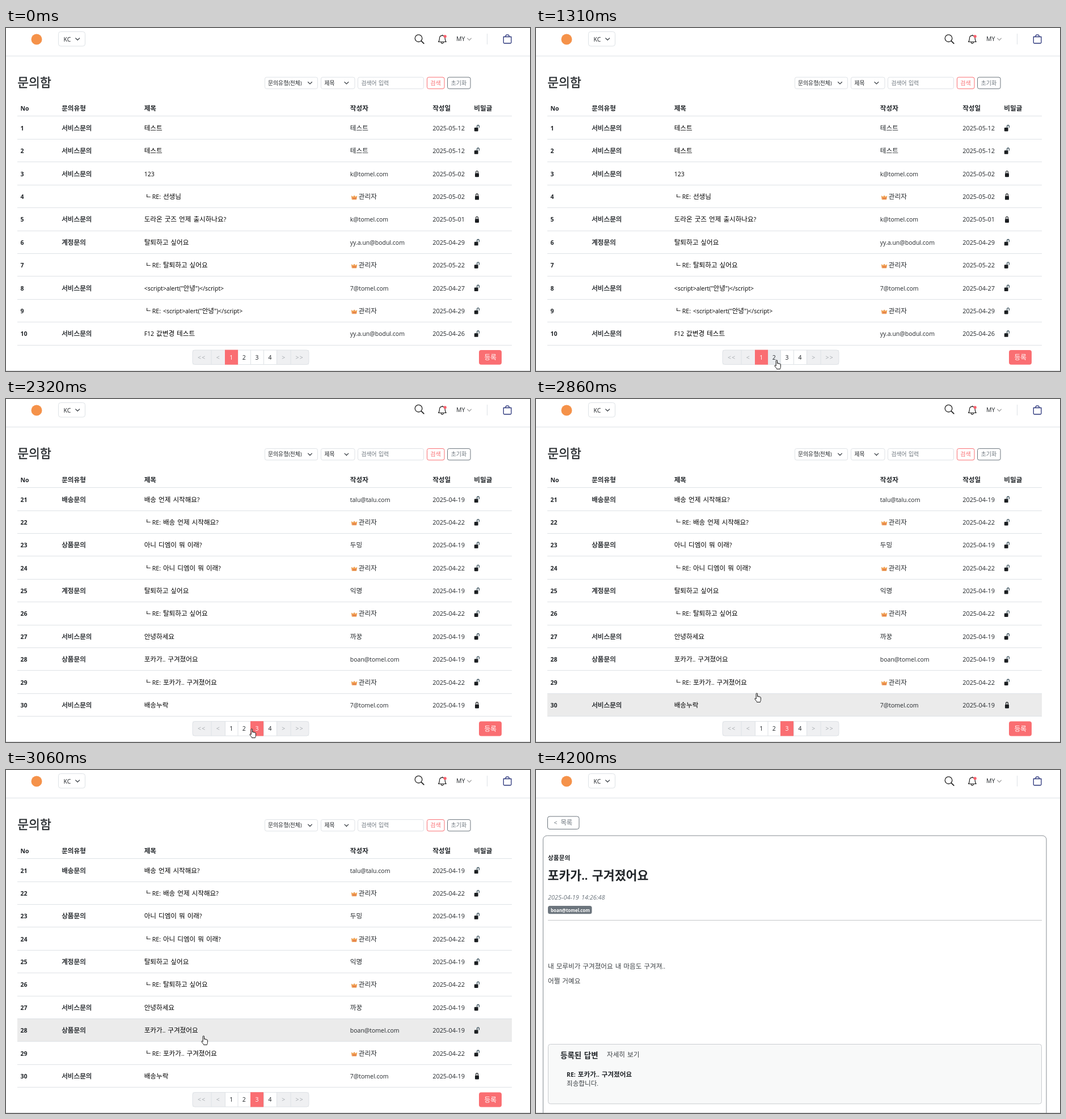
Write an HTML page that moves like this. It is 924 by 606 pixels and loops after 5390 ms.

```html
<!DOCTYPE html>
<html lang="ko">
<head>
<meta charset="utf-8">
<title>문의함</title>
<style>
html, body { margin: 0; width: 100%; height: 100%; overflow: hidden; background: #fff; }
svg { display: block; position: absolute; left: 0; top: 0; }
text { font-family: "Open Sans", "Noto Sans", "Noto Sans CJK KR", sans-serif; word-spacing: .12em; white-space: pre; }
tspan { font-family: "Noto Sans CJK KR", "Noto Sans CJK", sans-serif; font-size: 1.105em; }
</style>
</head>
<body>
<svg width="924" height="606" viewBox="0 0 924 606">
  <g id="view"></g>
  <g id="cursor" fill="#fff" stroke="#111" stroke-linejoin="round"><path id="shape"/></g>
</svg>
<script>
const LOOP = 5390, INK = '#212529', SOFT = '#3c4044', GREY = '#6c757d', LINE = '#dee2e6', RED = '#fa6e72';
const $ = id => document.getElementById(id);

const TYPES = { S: '서비스문의', A: '계정문의', D: '배송문의', P: '상품문의', '': '' };
// type | title | author | date | secret; a row without a type is the administrator's reply
const PAGES = [
  ['S|테스트|테스트|05-12', 'S|테스트|테스트|05-12', 'S|123|k@tomel.com|05-02|1', '|선생님||05-02|1',
   'S|도라온 굿즈 언제 출시하나요?|k@tomel.com|05-01|1', 'A|탈퇴하고 싶어요|yy.a.un@bodul.com|04-29',
   '|탈퇴하고 싶어요||05-22', 'S|<script>alert("안녕")<\/script>|7@tomel.com|04-27',
   '|<script>alert("안녕")<\/script>||04-29', 'S|F12 값변경 테스트|yy.a.un@bodul.com|04-26'],
  ['S|상품문의할게|7@tomel.com|04-23', 'A|계정문의할게요|마도린|04-23', 'S|저를 사칭해요|k@tomel.com|04-22|1',
   '|저를 사칭해요||04-22|1', 'A|로그인이 안 돼요|로그인되게 해주세요|04-21', '|로그인이 안 돼요||04-22',
   'A|닉네임변경|테스터|04-19', '|닉네임변경||04-22', 'S|점검|익명|04-19', '|점검||04-22'],
  ['D|배송 언제 시작해요?|talu@talu.com|04-19', '|배송 언제 시작해요?||04-22', 'P|아니 디엠이 뭐 이래?|두밍|04-19',
   '|아니 디엠이 뭐 이래?||04-22', 'A|탈퇴하고 싶어요|익명|04-19', '|탈퇴하고 싶어요||04-22',
   'S|안녕하세요|까꿍|04-19', 'P|포카가.. 구겨졌어요|boan@tomel.com|04-19',
   '|포카가.. 구겨졌어요||04-22', 'S|배송누락|7@tomel.com|04-19|1']
];
const CELLS = [329, 361.5, 386, 408.5, 431, 454, 477, 501.5, 534];

function text(x, y, s, size = 10.5, fill = INK, more = '') {
  const body = s.replace(/</g, '&lt;').replace(/[\u3131-\uD7A3]+/g, '<tspan>$&</tspan>');
  return `<text x="${x}" y="${y}" font-size="${size}" fill="${fill}" ${more}>${body}</text>`;
}
const bold = (x, y, s, size, fill) => text(x, y, s, size, fill, 'font-weight="700"');
const medium = (x, y, s, size) => text(x, y, s, size, INK, `stroke="${INK}" stroke-width=".35"`);
const rect = (x, y, w, h, fill, stroke = 'none', r = 0) =>
  `<rect x="${x}" y="${y}" width="${w}" height="${h}" rx="${r}" fill="${fill}" stroke="${stroke}"/>`;
const box = (x, y, w, h, stroke = LINE, r = 3) => rect(x, y, w, h, '#fff', stroke, r);
const path = (d, stroke, width = 1.2, fill = 'none') =>
  `<path d="${d}" fill="${fill}" stroke="${stroke}" stroke-width="${width}" stroke-linecap="round" stroke-linejoin="round"/>`;
const chevron = (x, y, color = '#343a40') => path(`M${x} ${y}l3.4 3.4 3.4-3.4`, color);
const at = (x, y, s) => `<g transform="translate(${x} ${y})">${s}</g>`;

function header(lift) {
  return rect(0, 49, 924, 1, LINE) + rect(0, 605, 924, 1, '#d5d6d8')
    + '<circle cx="54" cy="20" r="9.5" fill="#f5924a"/>'
    + box(92.5, 6.5, 47, 25.5, LINE, 4) + text(101.5, 23.5, 'KC') + chevron(122.8, 18)
    + at(0, -lift, '<circle cx="727.5" cy="18.2" r="6.3" fill="none" stroke="#222" stroke-width="1.3"/>'
      + path('M732.2 22.8l4.6 4.6', '#222', 1.7))
    + path('M762.5 24.5c2-2 1.8-4.5 2-7 .4-5.5 9-5.5 9.6 0 .2 2.5 0 5 2 7zM767.3 25c.3 3.2 3.6 3.2 4 0M769.3 13v-1', '#222')
    + '<circle cx="774.2" cy="14.8" r="2.6" fill="#fa5f6b"/>'
    + text(794, 23.3, 'MY') + chevron(813.6, 18.2, '#999')
    + rect(848, 10, 1, 19, LINE)
    + path('M877.3 15.5h13.6v10q0 1.5-1.5 1.5h-10.6q-1.5 0-1.5-1.5zM880.8 15.5c0-4.8 6.6-4.8 6.6 0', '#29347a', 1.3);
}

function lock(y, closed) {
  return closed
    ? rect(827, y - 1.3, 7, 6.8, '#1b1e21', 'none', 1.2) + path(`M828.6 ${y - 1}v-2c0-3 3.8-3 3.8 0v2`, '#1b1e21')
    : rect(825.8, y - 1, 6.8, 6.5, '#1b1e21', 'none', 1.2) + path(`M830.6 ${y - 1}v-2.2c0-3 3.7-3 3.7 0v2`, '#2c4450');
}

const crown = y => path(`M609.5 ${y - 1.2}l2.6 1.6 2-2.6 2 2.6 2.7-1.6-1 6h-7.3z`, '#eda35c', .8, '#f2a04e')
  + path(`M611.5 ${y + 3}h5.5`, '#dc6a4c', 1.3);

function tools() {
  return box(456.5, 87, 93, 20.3) + text(462, 100.8, '문의유형(전체)', 8.9) + chevron(532.6, 95.5)
    + box(555.5, 87, 59.5, 20.3) + text(561.5, 100.8, '제목', 8.9) + chevron(597, 95.5)
    + box(620.5, 87, 116, 20.3) + text(626.5, 100.8, '검색어 입력', 8.9, GREY)
    + box(742.5, 87, 30.5, 20.3, RED) + text(748.2, 100.8, '검색', 9.1, RED)
    + box(778.5, 87, 40.5, 20.3, GREY) + text(784.5, 100.8, '초기화', 9.1, GREY);
}

function pager(page, hover) {
  const names = ['<<', '<', '1', '2', '3', '4', '>', '>>'];
  let s = '', marks = '';
  names.forEach((name, i) => {
    const x = CELLS[i], w = CELLS[i + 1] - x, off = i < 2 || i > 5, on = i == page + 2;
    s += rect(x, 569, w, 25.5, off ? '#eff0f2' : i == hover ? '#e9ecef' : '#fff');
    if (i) s += rect(x, 569, 1, 25.5, LINE);
    marks += text(x + w / 2, 585.6, name, 10.5, on ? '#fff' : off ? '#a3a8ad' : INK,
      'text-anchor="middle"' + (name.length > 1 ? ' letter-spacing="1.2"' : ''));
  });
  return s + rect(329, 569, 205, 25.5, 'none', LINE, 4)
    + rect(CELLS[page + 2], 568.6, 23, 26.2, RED) + marks;
}

const lineY = (page, i) => Math.floor(page ? 156.6 + 40.4 * i : 155.9 + 40.44 * i);

function list(page, hoverRow, hoverCell) {
  let lines = '', s = tools();
  if (hoverRow >= 0) {
    const top = lineY(page, hoverRow);
    lines += rect(20, top, 872, lineY(page, hoverRow + 1) - top, '#ebebeb');
  }
  for (let i = 0; i < 11; i++) lines += rect(20, lineY(page, i), 872, 1, LINE);
  [[25.5, 'No'], [98.2, '문의유형'], [243.7, '제목'], [606.8, '작성자'], [752.2, '작성일'], [825.3, '비밀글']]
    .forEach(([x, name]) => s += bold(x, 146.2, name));
  PAGES[page].forEach((row, i) => {
    const [type, title, author, date, secret] = row.split('|');
    const mid = 177 + 40.37 * i, y = mid + 4;
    s += bold(25.5, y, String(page * 10 + i + 1)) + medium(98.2, y, TYPES[type])
      + (type ? text(243.7, y, title, 10.5, '#000')
        : text(246, y - 1.5, 'ㄴ', 10.5, '#000') + text(257.8, y, 'RE: ' + title, 10.5, '#000'))
      + (author ? text(606.8, y, author) : crown(mid) + text(621.8, y, '관리자'))
      + text(752.2, y, '2025-' + date, 10.9) + lock(mid, secret);
  });
  s += pager(page, hoverCell) + rect(834, 569, 40, 25.8, RED, 'none', 4) + text(843.5, 586, '등록', 10.5, '#fff');
  return header(page ? 1.5 : 0) + lines + medium(20.3, 103.8, '문의함', 19.5) + at(0, page ? .6 : 0, s);
}

function detail() {
  return header(0)
    + box(20.5, 82, 55.5, 22.5, GREY, 3.5) + text(31.5, 97, '<', 10.5, GREY) + text(43.5, 97, '목록', 10.2, GREY)
    + rect(12.5, 116, 887.5, 520, 'none', '#868c92', 7)
    + bold(21, 159.2, '상품문의', 9.7) + bold(20.5, 194.2, '포카가.. 구겨졌어요', 19.6)
    + text(21, 228.8, '2025-04-19 14:26:48', 10.9, GREY, 'font-style="italic"')
    + rect(21, 240, 77.5, 14.3, GREY, 'none', 3.5) + bold(26, 250.6, 'boan@tomel.com', 7.9, '#fff')
    + rect(21, 265, 871, 1, '#c4c6c8')
    + text(21, 350.8, '내 모루비가 구겨졌어요 내 마음도 구겨져..', 10.5, SOFT) + text(21, 377.2, '어쩔 거예요', 10.5, SOFT)
    + rect(21.5, 484.5, 870, 105.3, '#f8f9f9', '#c9ccd0', 4)
    + bold(43, 508.6, '등록된 답변', 12.2) + text(125, 507.2, '자세히 보기', 10.5, SOFT)
    + bold(54, 542.2, 'RE: 포카가.. 구겨졌어요') + text(54, 558.4, '죄송합니다.', 10.5, SOFT);
}

// time, x, y of the pointer
const MOVES = [
  [510, 757, 596], [845, 475, 591], [1046, 397, 576], [1113, 399, 579], [1310, 420, 586], [1450, 420, 586],
  [1580, 421, 583], [1980, 428, 583], [2320, 429, 582], [2620, 429, 582], [2855, 385, 519], [3056, 344, 469],
  [3150, 345, 466], [3220, 345, 466], [3400, 334, 454], [3560, 334, 454], [4060, 905, 520], [4128, 907, 521]
];
const ARROW = 'M.5 .5V11.5L3 9.2 4.8 13 6.5 12.2 4.9 8.5H8.3Z';
const HAND = 'M3.2 10V1.9a1.15 1.15 0 0 1 2.3 0V7a1 1 0 0 1 2 0v.4a1 1 0 0 1 2 .2v.5a1 1 0 0 1 1.9.5v4c0 2-1 2.3-1 4H4.5c0-1.5-1.7-2.6-3.5-5.4-.5-1.3.9-2 2.2-.2z';

// The pointer advances in steps of 67 ms
function pointer(t) {
  const q = 510 + Math.floor((t - 500) / 67) * 67;
  const i = MOVES.findIndex(m => m[0] > q);
  if (i < 0) return MOVES[MOVES.length - 1].slice(1);
  if (!i) return MOVES[0].slice(1);
  const [t0, x0, y0] = MOVES[i - 1], [t1, x1, y1] = MOVES[i], k = (q - t0) / (t1 - t0);
  return [x0 + (x1 - x0) * k, y0 + (y1 - y0) * k];
}

let shown = '';
function draw(t) {
  const page = t < 1450 ? 0 : t < 2050 ? 1 : t < 3560 ? 2 : 3;
  const visible = t >= 510 && t < 4200, [x, y] = pointer(t);
  const hand = t > 900 && page < 3;
  let row = -1, cell = -1;
  if (visible && hand && t > 1040) {
    const tipX = x + 4, tipY = y + 2;
    if (tipY > 569 && tipY < 595) cell = CELLS.findIndex(c => c > tipX) - 1;
    for (let i = 0; i < 10; i++)
      if (tipY >= lineY(page, i) && tipY < lineY(page, i + 1)) row = i;
  }
  const key = [page, row, cell].join();
  if (key != shown) {
    shown = key;
    $('view').innerHTML = page < 3 ? list(page, row, cell) : detail();
  }
  $('cursor').style.display = visible ? '' : 'none';
  $('cursor').setAttribute('transform', `translate(${x} ${y})`);
  $('shape').setAttribute('d', hand ? HAND : ARROW);
}

const start = performance.now();
function tick() {
  draw((performance.now() - start) % LOOP);
  requestAnimationFrame(tick);
}
tick();
</script>
</body>
</html>
```
